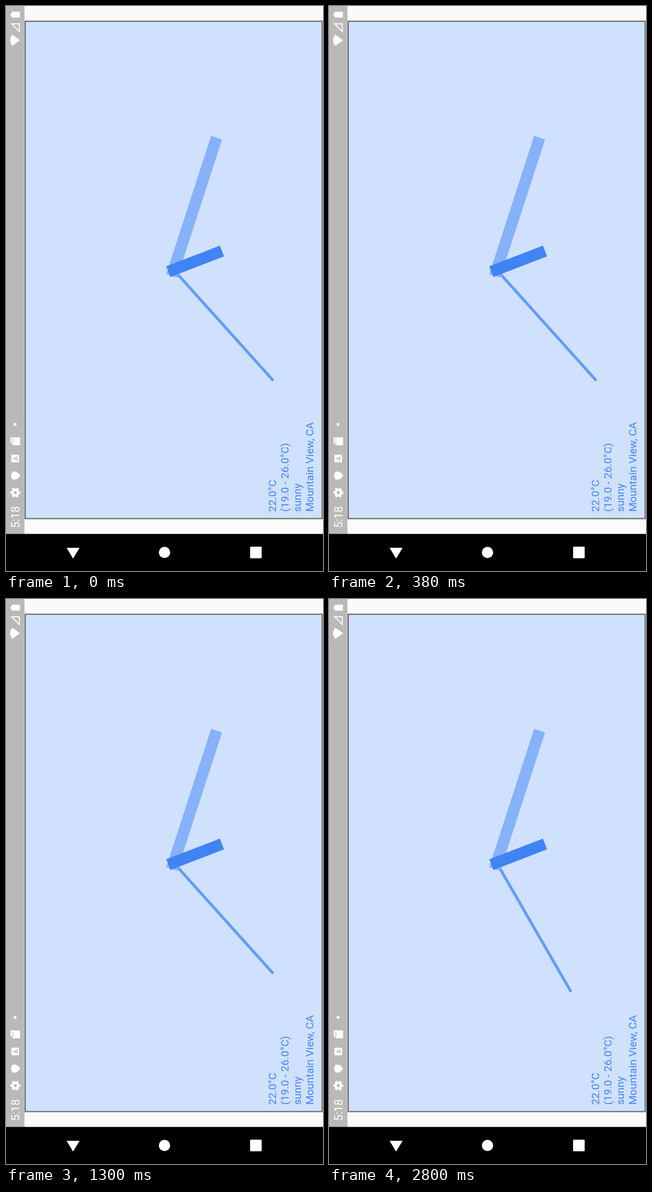
These frames come from a looping animation (561 by 998 pixels, 2.96 s). An HTML page:

```html
<!DOCTYPE html>
<html lang="en">
<head>
<meta charset="utf-8">
<title>Analog clock</title>
<style>
  html, body { margin: 0; width: 100%; height: 100%; overflow: hidden; background: #fafafa; }
  svg { display: block; width: 561px; height: 998px; font-family: Roboto, sans-serif; }
</style>
</head>
<body>
<svg viewBox="0 0 561 998">
  <rect width="561" height="998" fill="#fafafa"/>
  <rect width="32.7" height="933" fill="#b9b9b9"/>
  <rect x="34" y="27" width="525.5" height="878.4" fill="#d0e1fe" stroke="#707070" stroke-width="2.2"/>

  <!-- status icons -->
  <g fill="#fff">
    <path d="M10 10H24.5V20.5H10V18H8V13H10Z"/>
    <path d="M23.5 31.5V45L10 31.5Z" fill="none" stroke="#fff" stroke-width="1.8"/>
    <path d="M25 60.5L11 50.5Q3.5 60.5 11 70.5Z"/>
    <circle cx="16" cy="739" r="2.6"/>
    <path d="M9 762H24Q25 762 25 763V775Q25 776 24 776H13L8 771V763Q8 762 9 762Z"/>
    <path d="M10 765.5H14M10 768.5H14M10 771.5H14" stroke="#b9b9b9" stroke-width="1.2"/>
    <rect x="9.5" y="792.5" width="13.5" height="13.5" rx="1"/>
    <path d="M8.5 829.5L11.5 822.5H17Q22 824 25 829.5Q22 835 17 836.5H11.5Z"/>
    <circle cx="16.5" cy="859.5" r="4.8" fill="none" stroke="#fff" stroke-width="4.2"/>
    <circle cx="16.5" cy="859.5" r="7.4" fill="none" stroke="#fff" stroke-width="3"
      stroke-dasharray="4.2 3.549" stroke-dashoffset="2.1"/>
    <text transform="translate(24 922) rotate(-90)" font-size="20">5:18</text>
  </g>
  <text transform="translate(20.5 799.2) rotate(-90)" font-size="11" font-weight="700"
    text-anchor="middle" fill="#b9b9b9">A</text>

  <!-- clock hands -->
  <g transform="translate(296.8 466.1)">
    <rect id="second" x="-2.5" width="5" height="263.2" fill="#609cfa"/>
    <rect x="-10.2" y="-245.6" width="20.4" height="257" fill="#87b1f8" transform="rotate(18)"/>
    <rect x="-10.7" y="-91.7" width="20.4" height="101.7" fill="#4084f4" transform="rotate(69)"/>
  </g>

  <!-- weather -->
  <g transform="translate(477.8 893.6) rotate(-90)" font-size="19.1" fill="#4285f4">
    <text>22.0°C</text>
    <text y="22">(19.0 - 26.0°C)</text>
    <text y="44">sunny</text>
    <text y="66">Mountain View, CA</text>
  </g>

  <!-- navigation bar -->
  <rect y="932.5" width="561" height="65.5"/>
  <g fill="#fff">
    <path d="M107.2 957H130.3L118.7 976Z"/>
    <circle cx="280.5" cy="965.3" r="10"/>
    <rect x="432" y="955" width="20.5" height="20.5" rx="1.5"/>
  </g>
</svg>
<script>
  const LOOP = 2960;
  const TICKS = [1710, 2750];
  const second = document.getElementById('second');
  const start = performance.now();

  function draw() {
    const t = (performance.now() - start) % LOOP;
    const ticks = TICKS.filter(tick => t >= tick).length;
    second.setAttribute('transform', `rotate(${-42 + 6 * ticks})`);
    requestAnimationFrame(draw);
  }
  draw();
</script>
</body>
</html>
```
